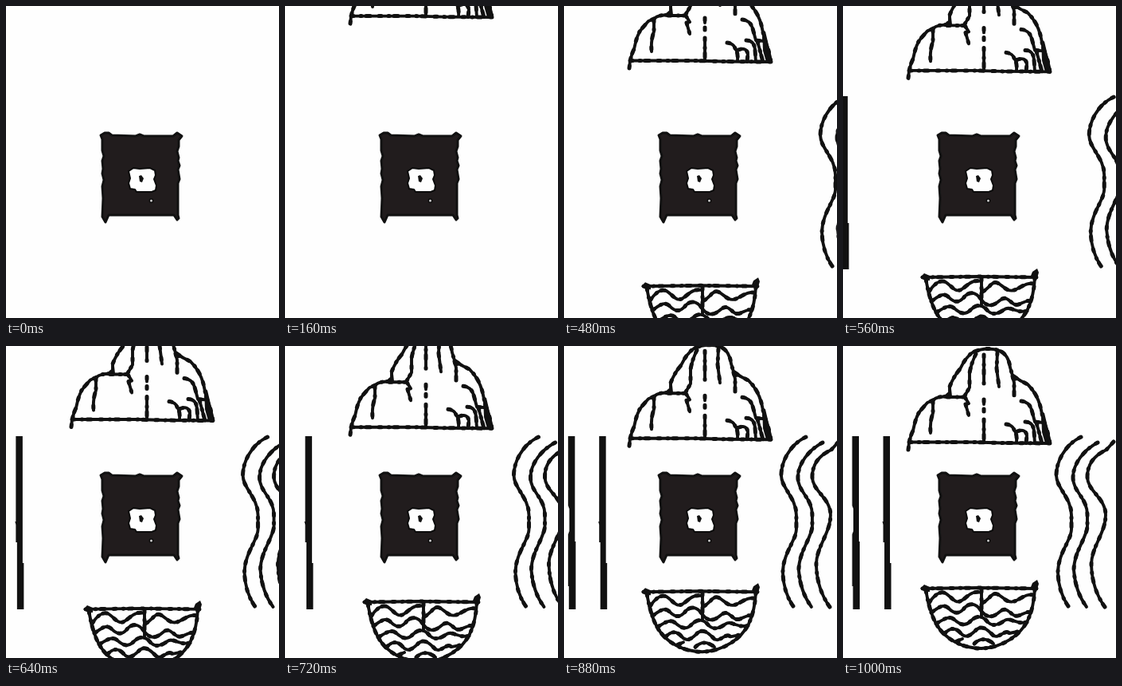
Recreate the animation shown at these times as an HTML page. Size 343x391 px, loop 1080 ms.

```html
<!DOCTYPE html>
<html lang="en">
<head>
<meta charset="utf-8">
<title>Five elements</title>
<style>
  html, body { margin: 0; width: 100%; height: 100%; overflow: hidden; background: #fefefe; }
  svg { display: block; width: 100%; height: 100%; }
  .ink { fill: none; stroke: #111; stroke-width: 3.9; stroke-linecap: round; stroke-linejoin: round; }
  .blobs { stroke-width: 5; stroke-dasharray: 3 9 1 6 5 11; }
  .solid { fill: #111; stroke: none; }
</style>
</head>
<body>
<svg viewBox="0 0 343 391">
  <g id="mountain">
    <g class="ink">
      <path d="M82 130 L83 121 Q85 112 88 106 Q92 86 98 80 L106 71 L113 68 Q116 65 121 64 L130 63 L134 59 L134 51 Q139 38 147 29 Q154 14 163 8 Q180 0 197 6 Q208 11 210 27 L213 37 L222 43 L232 48 Q244 60 248 76 L252 94 Q257 104 260 122"/>
      <path d="M83 120.5 L165 120.5 L200 121.5 L260 122"/>
      <path d="M113 69 L113 84 Q109 95 110 109 M131 64 L153 64 L158 72 L154 73 L158 87 M167 10 Q161 22 159 34 L159 52 L152 64"/>
      <path d="M177 11V47 M177 67V73 M177 79V82 M177 92V120 M194 8 L193 28 L196 51 M213 38 L215 46 L215 62"/>
      <path d="M224 69 Q234 70 237 80 L241 95 L252 96 M205 98 Q213 99 215 105 Q219 110 218 121 M219 107 Q229 103 231 112 L230 122"/>
      <path d="M229 95 Q239 95 240 107 L241 122 M243 96 L250 122"/>
    </g>
    <path class="solid" d="M249 82 L253 84 L262 122 L254 122 L250 108Z M130 66 L136 54 L137 63Z M211 33 L224 42 L215 44Z"/>
  </g>

  <g id="bowl">
    <g class="ink">
      <path d="M100 304 L170 303 L243 304 M104 306 Q109 334 117 348 C128 368 151 379 174 379 C201 378 223 362 232 344 Q240 327 241 304"/>
      <path d="M174 305 V340"/>
      <path d="M108 322 C114 313 122 306 129 310 S141 324 149 319 S162 306 174 309 M175 322 C184 318 187 308 194 311 S206 323 215 320 S229 310 240 312"/>
      <path d="M111 334 C120 328 126 322 133 329 S146 336 152 329 S166 321 174 332 S190 339 197 333 S207 332 214 337 S228 331 236 334"/>
      <path d="M117 348 C126 343 133 337 140 343 S153 352 160 345 S174 337 181 345 S196 349 203 344 S218 350 231 346"/>
      <path d="M127 361 C135 352 142 353 148 360 S160 363 167 356 S181 355 188 362 S203 354 209 360 L219 358 M143 370 L150 367 M165 373 C173 365 182 367 189 373"/>
    </g>
    <path class="solid" d="M97 304 L102 299 L109 302 L109 308 L103 308Z M236 302 L238 297 L244 293 L246 298 L243 308Z"/>
  </g>

  <g id="lines">
    <path class="solid" d="M11.5 113 H20 V245 H21 V330 H12.5 V301 H11.5 V236 L13 232 V204 L11.5 200Z"/>
    <path class="solid" d="M50.5 113 H59 V272 H60.5 V330 H52 V246 H50.5 V224 L49.5 220 H50.5Z"/>
  </g>

  <g id="waves">
    <g class="ink">
      <path d="M299 114 C278 124 268 146 268 162 S287 190 287 212 V230 C287 243 270 260 270 284 Q271 309 283 326"/>
      <path d="M320 121 C303 130 289 147 289 165 S307 190 307 212 V226 C306 241 290 258 290 281 Q292 308 306 327"/>
      <path d="M340 120 L331 130 C318 136 307 146 307 164 S330 190 330 212 S312 252 312 274 Q313 305 329 327"/>
    </g>
  </g>

  <g id="square">
    <path fill="#211c1d" stroke="#111" stroke-width="3" stroke-linejoin="round"
      d="M119 162 L124 159 L129 159 L133 162 L163 163 L168 161 L173 163 L210 163 L215 159 L221 163 L217 168 L217 176 L215 182 L217 190 L216 194 L218 200 L216 205 L218 217 L216 222 L216 262 L217 266 L215 268 L211 262 L129 262 L125 271 L121 264 L122 241 L121 226 L123 218 L121 210 L122 204 L121 194 L123 188 L121 181 L121 167Z"/>
    <path fill="#fefefe" stroke="#0b0b0b" stroke-width="2"
      d="M154 207 L160 203 L168 204 L181 203 L187 206 L188 212 L186 217 L189 225 L188 231 L183 233 L164 233 L162 230 L156 229 L154 222 L156 216Z"/>
    <path fill="#111" d="M167 213 L170 212 L173 216 L171 221 L168 220Z"/>
    <circle cx="182.5" cy="244" r="2.2" fill="#ccc" stroke="#0b0b0b" stroke-width="1.4"/>
  </g>
</svg>
<script>
  const LOOP = 1080, TRAVEL = 1000, STEP = 40, REACH = 136;
  const parts = [
    ["mountain", 0, -1],
    ["bowl", 0, 0.91],
    ["lines", -1.34, 0],
    ["waves", 1.04, 0],
  ].map(([id, dx, dy]) => ({ node: document.getElementById(id), dx, dy }));

  // A second, broken and wider stroke gives the brush its uneven edge.
  for (const group of document.querySelectorAll(".ink")) {
    const blobs = group.cloneNode(true);
    blobs.classList.add("blobs");
    group.after(blobs);
  }

  // Share of the way still to go: nearly steady, then slowing down.
  function remaining(progress) {
    const u = 1 - progress;
    return u * (0.116 + u * (1.522 - 0.638 * u));
  }

  function draw(ms) {
    const time = Math.min(TRAVEL, Math.floor(ms / STEP) * STEP);
    const distance = REACH * remaining(time / TRAVEL);
    for (const { node, dx, dy } of parts) {
      node.setAttribute("transform", `translate(${dx * distance} ${dy * distance})`);
    }
  }

  const start = performance.now();
  function tick() {
    draw((performance.now() - start) % LOOP);
    requestAnimationFrame(tick);
  }
  tick();
</script>
</body>
</html>
```
